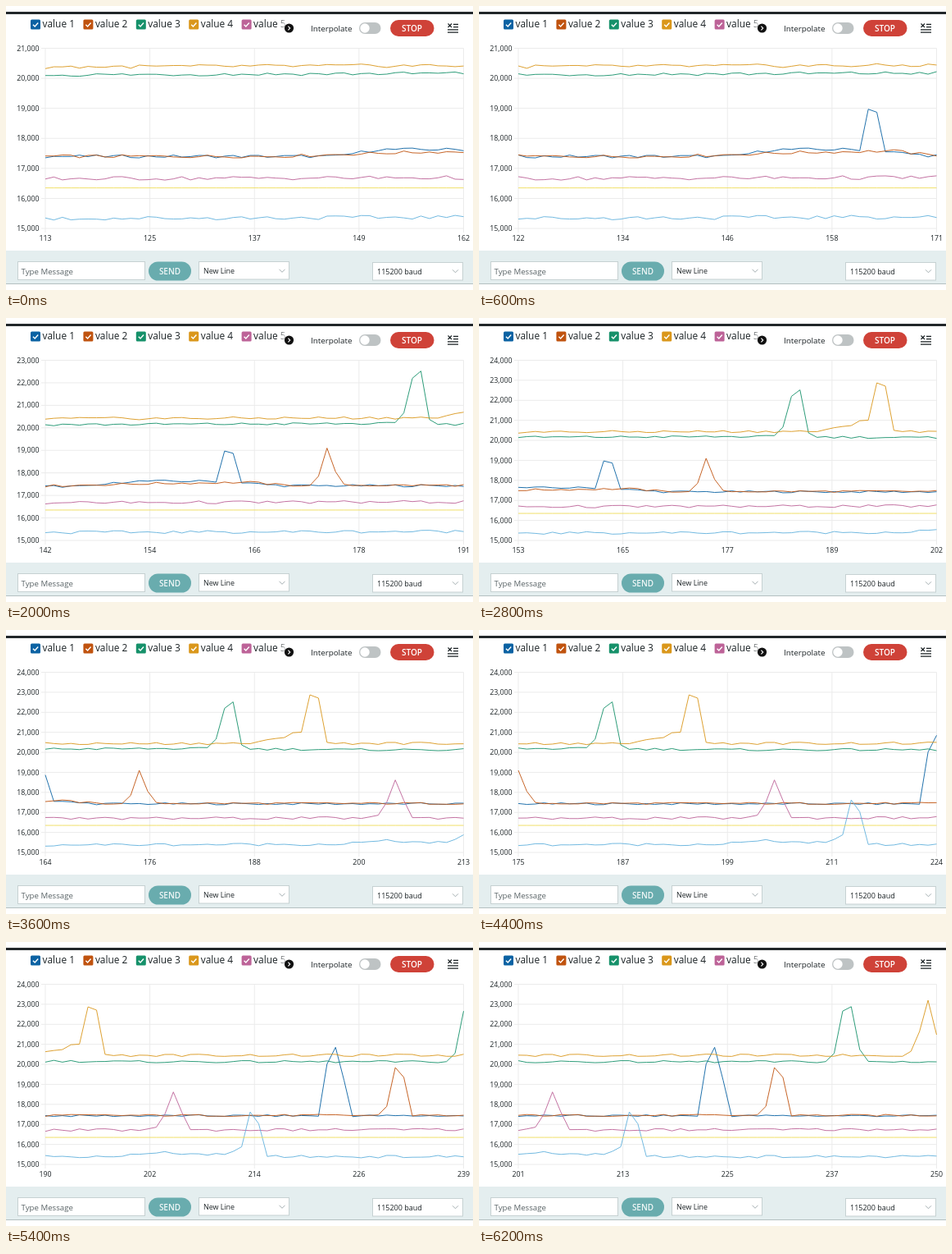
Recreate the animation shown at these times as an HTML page. Size 570 px wide and 346 px high, loop 6400 ms.

```html
<!DOCTYPE html>
<html lang="en">
<head>
<meta charset="utf-8">
<title>Serial plotter</title>
<style>
  html, body { margin: 0; width: 100%; height: 100%; overflow: hidden; background: #fff; }
  svg { display: block; width: 570px; height: 346px; font-family: "Open Sans", sans-serif; fill: #1b2225; }
  .axis { font-size: 8.8px; }
  .legend { font-size: 11.9px; }
  .button { font-size: 10px; font-weight: 600; fill: #fff; text-anchor: middle; }
  .line { fill: none; stroke-width: .9; stroke-linejoin: round; }
  .grid { fill: none; stroke: #ebebeb; }
  .box { fill: #fff; stroke: #c6d1d2; }
  .chevron { fill: none; stroke: #a3adb0; }
</style>
</head>
<body>
<svg viewBox="0 0 570 346">
  <defs>
    <linearGradient id="fade">
      <stop offset="0" stop-color="#fff" stop-opacity="0"/>
      <stop offset="1" stop-color="#fff"/>
    </linearGradient>
  </defs>
  <rect y="7" width="570" height="3" fill="#22272a"/>
  <g id="legend" class="legend"></g>
  <rect x="331" y="14" width="13" height="18" fill="url(#fade)"/>
  <circle cx="345.5" cy="27" r="5.6" fill="#111"/>
  <path d="M344.4 24.7l2.3 2.3-2.3 2.3" fill="none" stroke="#fff" stroke-width="1.1"/>

  <text x="372" y="31" font-size="9.8">Interpolate</text>
  <rect x="431" y="20" width="26.5" height="14" rx="7" fill="#bec3c4"/>
  <circle cx="438" cy="27" r="5.7" fill="#fff"/>
  <rect x="469" y="17" width="53.5" height="20" rx="10" fill="#cf4238"/>
  <text class="button" x="495.5" y="30.6">STOP</text>
  <path d="M539.5 21.5l4.5 4.5m0-4.5l-4.5 4.5M546 22.3h6M546 25.6h6M539 28.9h13M539 32.1h13" fill="none" stroke="#1b2225" stroke-width="1.2"/>

  <path id="grid" class="grid"/>
  <g id="lines"></g>
  <g id="yLabels" class="axis" text-anchor="end"></g>
  <g id="xLabels" class="axis" text-anchor="middle"></g>

  <rect y="298" width="570" height="40.5" fill="#e4eeef"/>
  <path d="M0 338.5h570" stroke="#b4bfc1"/>
  <rect class="box" x="14.5" y="311.5" width="155" height="22"/>
  <text x="18.5" y="326.6" font-size="9.7" fill="#596366">Type Message</text>
  <rect x="174" y="311.5" width="52" height="23" rx="11.5" fill="#69acae"/>
  <text class="button" x="200" y="326.6" fill-opacity=".9">SEND</text>
  <rect class="box" x="235.5" y="311.5" width="110" height="21.5"/>
  <text x="241" y="326" font-size="8.9">New Line</text>
  <path class="chevron" d="M333.5 320.8l3.5 3.5 3.5-3.5"/>
  <rect class="box" x="447.5" y="312.5" width="110" height="21.5"/>
  <text x="453" y="327" font-size="9">115200 baud</text>
  <path class="chevron" d="M545 321.3l3.5 3.5 3.5-3.5"/>
</svg>
<script>
const LEFT = 48, RIGHT = 558.5, TOP = 51.5, BOTTOM = 271;
const FIRST = 113, SPAN = 49, LAST = 250, LOW = 15000;
const STEP = 200, LOOP = 6400;

// trend: slow level as [sample, value] points; spikes: values from a first sample on.
const series = [
  { color: '#0a62a3', jitter: 50, trend: [[147, 17400], [152, 17630], [162, 17630], [170, 17430]],
    spikes: { 163: [18970, 18870], 223: [20010, 20850, 19200] } },
  { color: '#c0530f', jitter: 50, trend: [[140, 17400], [155, 17530], [166, 17580], [170, 17450]],
    spikes: { 174: [17850, 19100, 18050], 230: [17900, 19840, 19350] } },
  { color: '#16916a', jitter: 55, trend: [[113, 20110], [183, 20190], [200, 20130]],
    spikes: { 184: [20660, 22200, 22520, 20370], 238: [20550, 22660, 22880, 20740] } },
  { color: '#da971b', jitter: 60, trend: [[113, 20380], [188, 20450], [192, 20720], [197, 20450]],
    spikes: { 193: [20980, 21010, 22870, 22710], 247: [20650, 21640, 23200, 21480] } },
  { color: '#bd6398', jitter: 65, trend: [[113, 16660], [250, 16750]],
    spikes: { 203: [16860, 17510, 18620, 17600] } },
  { color: '#62b1dd', jitter: 65, trend: [[113, 15330], [198, 15410], [204, 15580], [216, 15390]],
    spikes: { 212: [15650, 15880, 17620, 17030] } },
  { color: '#efdc59', jitter: 0, trend: [[113, 16350]], spikes: {} }
];

const $ = id => document.getElementById(id);
function add(parent, tag, attrs, text = '') {
  const el = document.createElementNS('http://www.w3.org/2000/svg', tag);
  for (const name in attrs) el.setAttribute(name, attrs[name]);
  el.textContent = text;
  return parent.appendChild(el);
}
function noise(i, seed) {
  const v = Math.sin(i * 12.9898 + seed * 78.233) * 43758.5453;
  return (v - Math.floor(v)) * 2 - 1;
}
function level(trend, i) {
  const n = trend.findIndex(point => point[0] >= i);
  if (n < 0) return trend.at(-1)[1];
  if (n === 0) return trend[0][1];
  const [x0, y0] = trend[n - 1], [x1, y1] = trend[n];
  return y0 + (y1 - y0) * (i - x0) / (x1 - x0);
}

series.forEach((s, seed) => {
  s.values = [];
  for (let i = FIRST; i <= LAST; i++) s.values.push(level(s.trend, i) + s.jitter * noise(i, seed));
  for (const at in s.spikes) s.values.splice(at - FIRST, s.spikes[at].length, ...s.spikes[at]);
  s.line = add($('lines'), 'polyline', { class: 'line', stroke: s.color });
});
series.slice(0, 5).forEach((s, i) => {
  const x = 30 + i * 64.4;
  add($('legend'), 'rect', { x, y: 16.5, width: 12, height: 12, rx: 1.5, fill: s.color });
  add($('legend'), 'path', { d: `M${x + 3} 22.7l2.2 2.2 4-4.4`, fill: 'none', stroke: '#fff', 'stroke-width': 1.4 });
  add($('legend'), 'text', { x: x + 14.5, y: 25.9 }, `value ${i + 1}`);
});
const quarters = [0, 1, 2, 3, 4].map(q => LEFT + q * (RIGHT - LEFT) / 4);
const xLabels = quarters.map(x => add($('xLabels'), 'text', { x, y: 286.3 }));

function draw(step) {
  const offset = Math.floor(step * 2.825 + 0.78);
  const views = series.map(s => s.values.slice(offset, offset + SPAN + 1));
  const all = views.flat(), max = Math.max(...all), min = Math.min(...all);
  const rows = Math.ceil((max + (max - min) * 0.025 - LOW) / 1000);
  const toY = v => BOTTOM - (v - LOW) / (rows * 1000) * (BOTTOM - TOP);

  views.forEach((view, n) => series[n].line.setAttribute('points',
    view.map((v, i) => `${(LEFT + i * (RIGHT - LEFT) / SPAN).toFixed(2)},${toY(v).toFixed(2)}`).join(' ')));

  let grid = quarters.map(x => `M${x} ${TOP}V276`).join('');
  $('yLabels').textContent = '';
  for (let r = 0; r <= rows; r++) {
    const value = LOW + r * 1000, y = toY(value);
    grid += `M43 ${y}H${RIGHT}`;
    add($('yLabels'), 'text', { x: 40.5, y: y + 3.1 }, value.toLocaleString('en-US'));
  }
  $('grid').setAttribute('d', grid);
  xLabels.forEach((label, q) => label.textContent = Math.floor(FIRST + offset + q * SPAN / 4));
}

let shown = -1;
const start = performance.now();
function tick(now) {
  const step = Math.floor(Math.max(0, now - start) % LOOP / STEP);
  if (step !== shown) draw(shown = step);
  requestAnimationFrame(tick);
}
tick(start);
</script>
</body>
</html>
```
